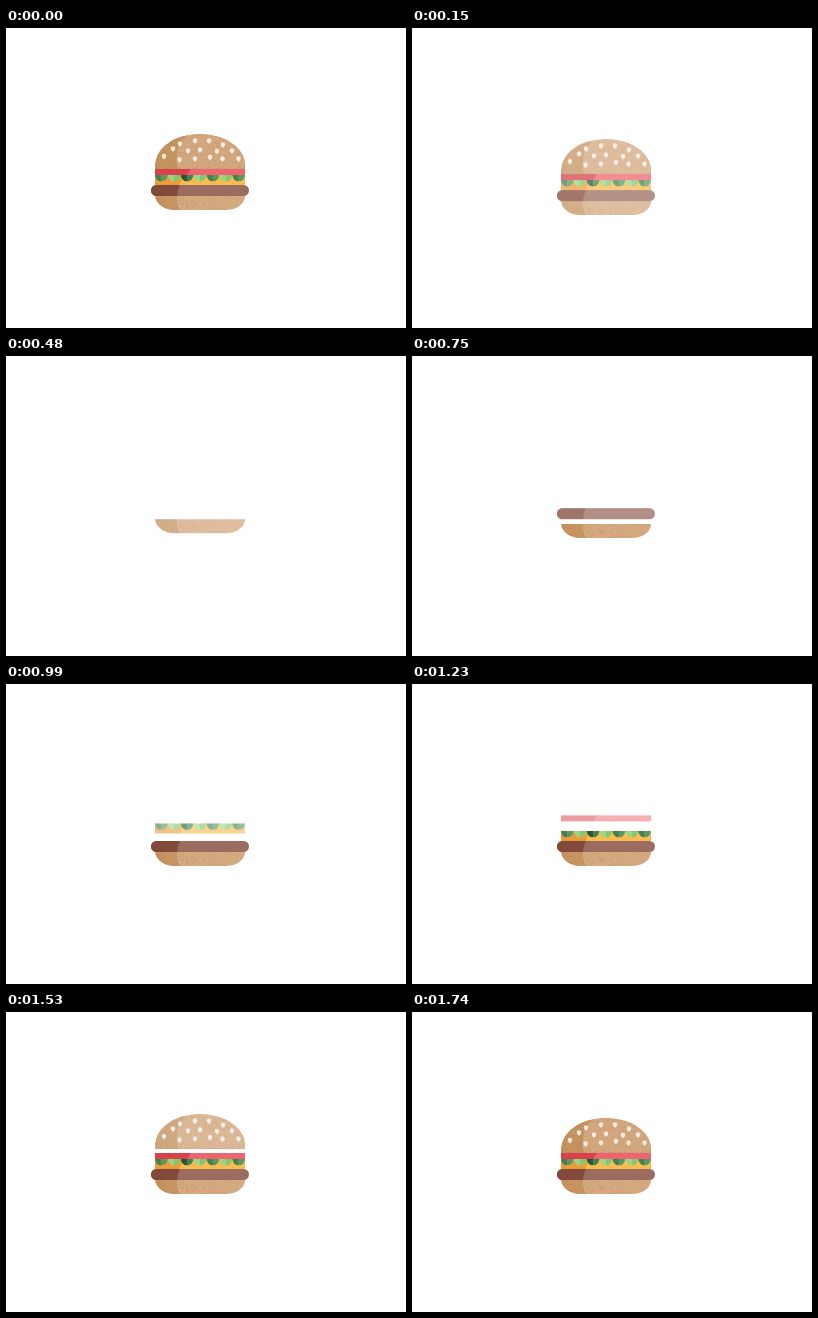
These frames come from a looping animation (400 by 300 pixels, 2700 ms). An HTML page:

```html
<!DOCTYPE html>
<html lang="en">
<head>
<meta charset="utf-8">
<title>Burger</title>
<style>
  html, body { margin: 0; width: 100%; height: 100%; overflow: hidden; background: #fff; }
  svg { display: block; width: 400px; height: 300px; }

  #burger { animation: leave 2700ms infinite; }
  .layer {
    --fall: cubic-bezier(.333, .667, .667, 1);
    animation: 2700ms linear infinite;
  }
  #base { animation-name: base; }
  #patty { animation-name: patty; }
  #salad { animation-name: salad; }
  #tomato { animation-name: tomato; }
  #crown { animation-name: crown; }

  /* The whole burger sinks and fades, then the layers drop in one by one. */
  @keyframes leave {
    0% { transform: none; opacity: 1; animation-timing-function: cubic-bezier(.333, 0, .667, .333); }
    11.1% { transform: translateY(20px); opacity: 0; }
    11.13%, 100% { transform: none; opacity: 1; }
  }
  @keyframes base {
    0%, 11.1% { transform: none; opacity: 1; }
    11.11%, 12.7% { transform: translateY(-20px); opacity: 0; animation-timing-function: var(--fall); }
    23.8%, 100% { transform: none; opacity: 1; }
  }
  @keyframes patty {
    0%, 11.1% { transform: none; opacity: 1; }
    11.11%, 22.7% { transform: translateY(-20px); opacity: 0; animation-timing-function: var(--fall); }
    33.8%, 100% { transform: none; opacity: 1; }
  }
  @keyframes salad {
    0%, 11.1% { transform: none; opacity: 1; }
    11.11%, 32.7% { transform: translateY(-20px); opacity: 0; animation-timing-function: var(--fall); }
    43.8%, 100% { transform: none; opacity: 1; }
  }
  @keyframes tomato {
    0%, 11.1% { transform: none; opacity: 1; }
    11.11%, 42.222% { transform: translateY(-20px); opacity: 0; animation-timing-function: var(--fall); }
    53.333%, 100% { transform: none; opacity: 1; }
  }
  @keyframes crown {
    0%, 11.1% { transform: none; opacity: 1; }
    11.11%, 50% { transform: translateY(-20px); opacity: 0; animation-timing-function: var(--fall); }
    63.333%, 100% { transform: none; opacity: 1; }
  }
</style>
</head>
<body>
<svg viewBox="0 0 400 300">
  <defs>
    <path id="baseShape" d="M149.400 168H239C239 176 230 182 220 182H169C159 182 149.400 176 149.400 168Z"/>
    <path id="crownShape" d="M149.400 141V137C149.400 120 169 106 194 106S239 120 239 137V141Z"/>
    <rect id="pattyShape" x="145" y="157" width="98" height="11" rx="5.5"/>
    <clipPath id="baseClip"><use href="#baseShape"/></clipPath>
    <clipPath id="crownClip"><use href="#crownShape"/></clipPath>
    <clipPath id="pattyClip"><use href="#pattyShape"/></clipPath>
    <path id="seed" d="M0 2.8C-1.4 1.6-2.3.5-2.3-.6A2.3 2.2 0 0 1 2.3-.6C2.3.5 1.4 1.6 0 2.8Z"/>
  </defs>

  <g id="burger">
    <g id="base" class="layer">
      <use href="#baseShape" fill="#d4a980"/>
      <g clip-path="url(#baseClip)">
        <path d="M145 168H170.500Q170.500 176 174 183H145Z" fill="#c69562"/>
        <path class="grain" fill="#a97748" opacity=".55"/>
      </g>
    </g>

    <g id="patty" class="layer">
      <use href="#pattyShape" fill="#9a6c5f"/>
      <path clip-path="url(#pattyClip)" d="M145 157H174Q171 162 171 168H145Z" fill="#82493a"/>
    </g>

    <g id="salad" class="layer">
      <path d="M149 147H239V157H149Z" fill="#f7bb50"/>
      <path d="M149 147H180Q175 151 173.500 157H149Z" fill="#ee9c3b"/>
      <g id="leaves"></g>
    </g>

    <g id="tomato" class="layer">
      <path d="M149 141H239V147H149Z" fill="#ef656f"/>
      <path d="M149 141H185Q182.500 144 181.500 147H149Z" fill="#da414c"/>
    </g>

    <g id="crown" class="layer">
      <use href="#crownShape" fill="#d2a77d"/>
      <g clip-path="url(#crownClip)">
        <path d="M145 104H185C173 112 168 126 172 141H145Z" fill="#c4935f"/>
        <path class="grain" fill="#a97748" opacity=".55"/>
        <use href="#crownShape" fill="none" stroke="#b17f50" stroke-opacity=".6" stroke-dasharray="1 1"/>
      </g>
      <g id="seeds" fill="#f5eadf"></g>
    </g>
  </g>
</svg>
<script>
  const find = id => document.getElementById(id);

  // Sesame seeds, as x, y
  const seeds = [
    [189, 113], [203, 113], [174, 116], [217, 117], [167, 121],
    [182, 123], [194, 122], [211, 123.5], [226, 123], [158, 128.5],
    [173.5, 132], [189, 131], [204, 129.5], [216.5, 131], [232.5, 131]
  ];
  find('seeds').innerHTML = seeds
    .map(([x, y]) => `<use href="#seed" x="${x}" y="${y}"/>`).join('');

  // Alternating half-round lettuce leaves, each in two tones
  const tones = [['#42804f', '#58986400'.slice(0, 7)], ['#9ad685', '#80c86e']];
  let leaves = '';
  for (let i = 0; i < 7; i++) {
    const x = 155.3 + i * 12.9;
    const [left, right] = i === 2 ? ['#1f5936', '#42804f'] : tones[i % 2];
    leaves += `<path d="M${x - 6.3} 147A6.3 6.3 0 0 0 ${x} 153.3V147Z" fill="${left}"/>` +
      `<path d="M${x} 147V153.3A6.3 6.3 0 0 0 ${x + 6.3} 147Z" fill="${right}"/>`;
  }
  find('leaves').innerHTML = leaves;

  // Fine bun texture, denser towards the shaded side
  let state = 17;
  const random = () => (state = state * 16807 % 2147483647) / 2147483647;
  function grain(id, top, height, count) {
    let d = '';
    for (let i = 0; i < count; i++) {
      const x = 149 + 90 * random() ** 1.8;
      const y = top + height * random();
      d += `M${x.toFixed(1)} ${y.toFixed(1)}h.8v.8h-.8z`;
    }
    find(id).querySelector('.grain').setAttribute('d', d);
  }
  grain('base', 168, 14, 150);
  grain('crown', 106, 35, 300);
</script>
</body>
</html>
```
